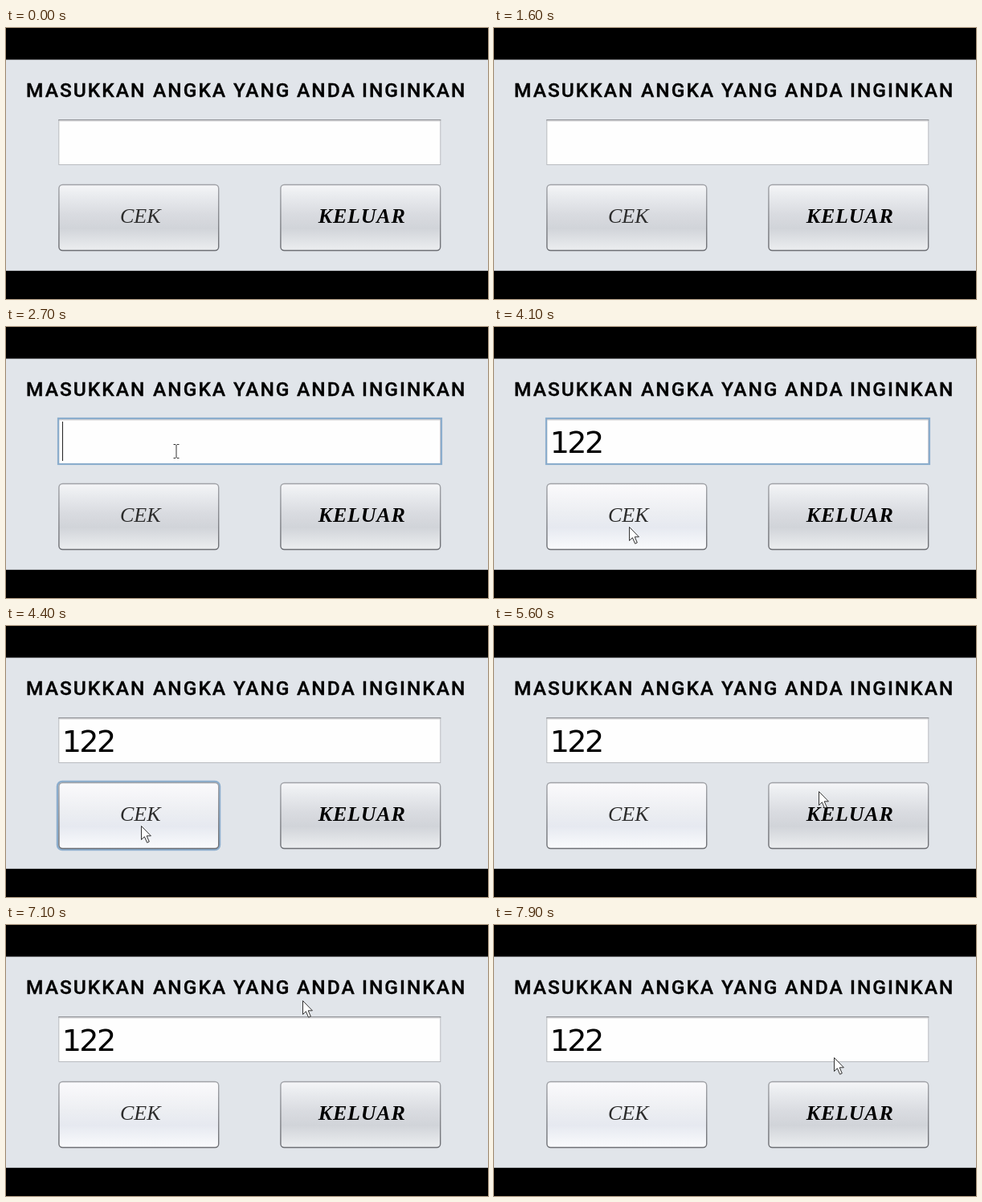
These frames come from a looping animation (600 px wide and 338 px high, 8000 ms). An HTML page:

```html
<!DOCTYPE html>
<html lang="id">
<head>
<meta charset="utf-8">
<title>Masukkan angka</title>
<style>
  html, body { margin: 0; width: 100%; height: 100%; overflow: hidden; background: #000; }
  svg { display: block; width: 100vw; height: 100vh; }
  .title { font: 500 24.5px Roboto, sans-serif; letter-spacing: 2px; stroke: #000; stroke-width: .35px; }
  .label { font: italic 26px "Liberation Serif", serif; text-anchor: middle; }
  .strong { font-weight: 700; letter-spacing: .8px; }
  .value { font: 38px "DejaVu Sans", sans-serif; letter-spacing: -2.6px; }
</style>
</head>
<body>
<svg viewBox="0 0 600 338">
  <defs>
    <linearGradient id="idle" x2="0" y2="1">
      <stop offset="0" stop-color="#f6f6f8"/>
      <stop offset=".12" stop-color="#eceef1"/>
      <stop offset=".45" stop-color="#d9dbe0"/>
      <stop offset=".66" stop-color="#d1d4d9"/>
      <stop offset="1" stop-color="#eceef0"/>
    </linearGradient>
    <linearGradient id="lit" x2="0" y2="1">
      <stop offset="0" stop-color="#fbfafc"/>
      <stop offset=".45" stop-color="#eceef2"/>
      <stop offset=".66" stop-color="#e6e9f0"/>
      <stop offset="1" stop-color="#fafbfd"/>
    </linearGradient>
    <linearGradient id="pressed" x2="0" y2="1">
      <stop offset="0" stop-color="#b9bfca"/>
      <stop offset=".6" stop-color="#a3abb9"/>
      <stop offset="1" stop-color="#c5cbd5"/>
    </linearGradient>
    <linearGradient id="edge" x2="0" y2="1">
      <stop offset="0" stop-color="#a0a2a7"/>
      <stop offset="1" stop-color="#6c6e73"/>
    </linearGradient>
  </defs>

  <rect width="600" height="338"/>
  <rect y="39.5" width="600" height="263.3" fill="#e1e5ea"/>
  <g id="title" class="title"></g>

  <rect x="65.8" y="114.5" width="475" height="56" fill="#fefefe" stroke="#b9bbc0"/>
  <path d="M65.3 114.8H541.3" stroke="#939599" stroke-width="1.4"/>
  <path d="M66.3 116H540.3" stroke="#d4d5d8"/>
  <rect id="focus" x="65" y="114" width="477" height="57" fill="none" stroke="#8badcd" stroke-width="2.2"/>
  <text id="value" class="value" x="69.8" y="157.4"></text>
  <path id="caret" d="M70.5 118V167" stroke="#222"/>

  <rect id="ring" x="64" y="194" width="202" height="85" rx="6" fill="none" stroke="#8badcd" stroke-width="2.5"/>
  <rect id="check" x="65.9" y="195.5" width="198.8" height="82" rx="4.5" stroke="url(#edge)" stroke-width="1.4"/>
  <text class="label" x="167.3" y="243" fill="#2c2c2c">CEK</text>
  <rect id="exit" x="341.9" y="195.5" width="198.8" height="82" rx="4.5" stroke="url(#edge)" stroke-width="1.4"/>
  <text class="label strong" x="443.2" y="243">KELUAR</text>

  <path id="arrow" d="M.5 .5V17.5L4.4 13.8L7.6 21.2L10.3 20L7.2 12.8H12.4Z" fill="#fff" stroke="#333"/>
  <path id="beam" d="M-3.5 -8.5H-1L0 -7.5L1 -8.5H3.5M0 -7.5V7.5M-3.5 8.5H-1L0 7.5L1 8.5H3.5" fill="none" stroke="#333"/>
</svg>

<script>
const LOOP = 8000, STEP = 100;
const el = id => document.getElementById(id);

// word, left edge
const words = [["MASUKKAN", 25], ["ANGKA", 183], ["YANG", 283], ["ANDA", 362], ["INGINKAN", 443]];
el("title").innerHTML = words.map(([w, x]) => `<text x="${x}" y="86.3">${w}</text>`).join("");

// time, x, y of the pointer
const path = [
  [1700, 430, 215], [1800, 340, 160], [1900, 260, 152], [2100, 212, 155],
  [3100, 212, 155], [3200, 196, 185], [3300, 176, 228], [3400, 168, 249],
  [5100, 168, 249], [5300, 252, 238], [5600, 404, 206], [5900, 418, 186],
  [6300, 408, 142], [6800, 382, 108], [7100, 369, 94], [7400, 364, 59],
  [7700, 361, 70], [7800, 390, 116], [7900, 423, 165]
];

// time, typed text
const typing = [[0, ""], [2900, "1"], [3000, "12"], [3100, "122"]];

const within = (t, a, b) => t >= a && t < b;
const show = (id, on) => el(id).setAttribute("visibility", on ? "visible" : "hidden");
const fill = (id, name) => el(id).setAttribute("fill", `url(#${name})`);

function pointerAt(t) {
  const i = path.findIndex(p => p[0] > t);
  if (i < 0) return path[path.length - 1].slice(1);
  const [t0, x0, y0] = path[Math.max(i - 1, 0)], [t1, x1, y1] = path[i];
  const k = i ? (t - t0) / (t1 - t0) : 0;
  return [Math.round(x0 + (x1 - x0) * k), Math.round(y0 + (y1 - y0) * k)];
}

function draw(t) {
  const [x, y] = pointerAt(t);
  const overField = within(t, 1800, 3200);
  for (const id of ["arrow", "beam"]) el(id).setAttribute("transform", `translate(${x} ${y})`);
  show("arrow", t >= 1700 && !overField);
  show("beam", overField);

  el("value").textContent = typing.filter(s => s[0] <= t).pop()[1];
  show("focus", within(t, 1800, 4200));
  show("caret", within(t, 1800, 2200) || within(t, 2700, 2900));

  show("ring", within(t, 4200, 4500));
  fill("check", within(t, 4200, 4300) ? "pressed" : t >= 3300 ? "lit" : "idle");
  fill("exit", within(t, 1700, 1800) ? "lit" : "idle");
}

function tick() {
  const t = performance.now() % LOOP;
  draw(Math.floor(t / STEP) * STEP);
  requestAnimationFrame(tick);
}
tick();
</script>
</body>
</html>
```
